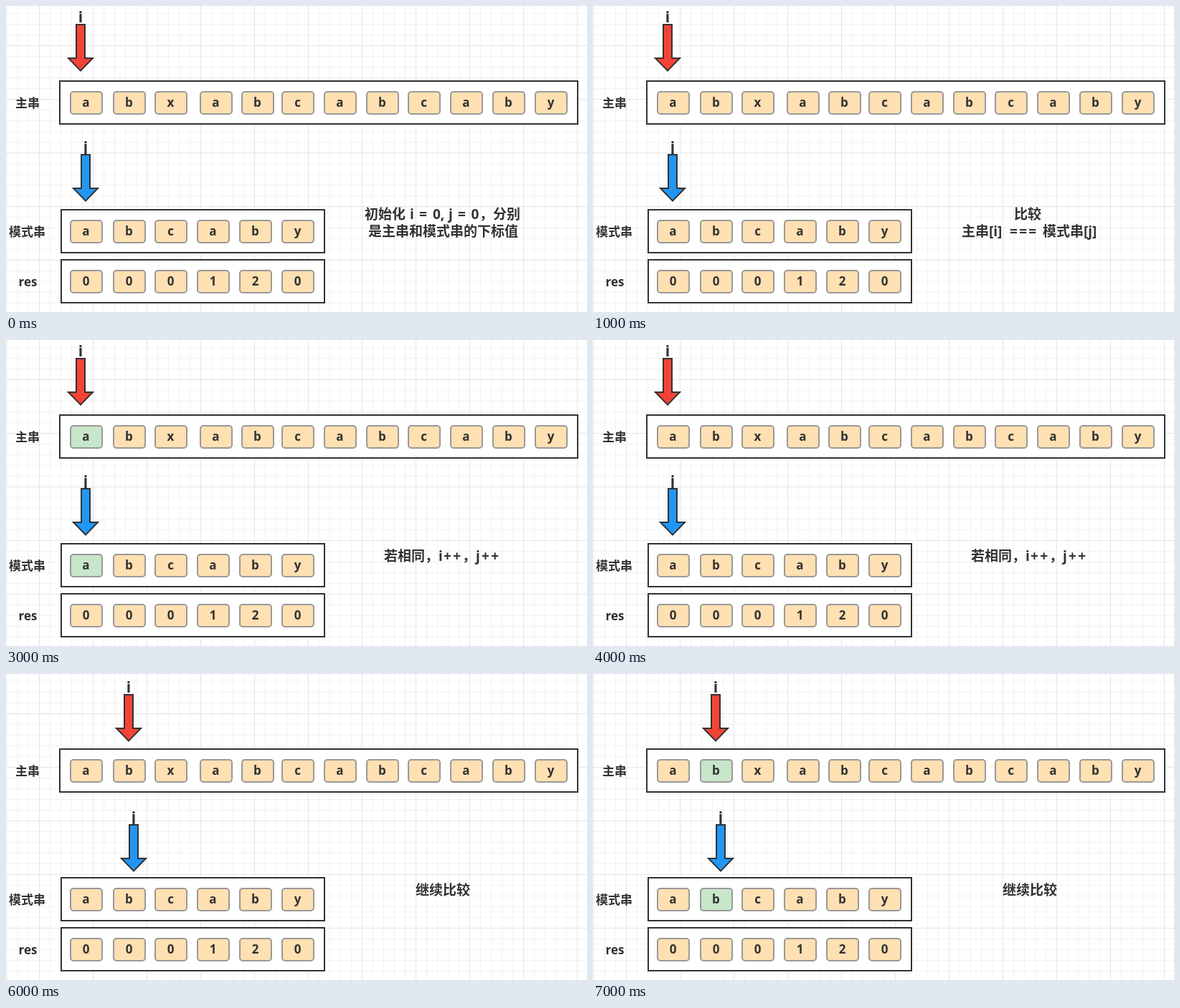
Animation, 810 px wide and 428 px high, one loop 8000 ms. Source, as an HTML page with a canvas:

```html
<!DOCTYPE html>
<html lang="zh-CN">
<head>
<meta charset="utf-8">
<style>
  html, body { margin: 0; width: 100%; height: 100%; overflow: hidden; background: #fff; }
  canvas { display: block; }
</style>
</head>
<body>
<canvas id="stage" width="810" height="428"></canvas>
<script>
const ctx = document.getElementById('stage').getContext('2d');
const LOOP = 8000;
const INK = '#323232', ORANGE = '#ffe0b2', GREEN = '#c8e6c9';
const MAIN_X = [90, 150, 208, 271, 329, 385, 444, 503, 561, 620, 679, 738];
const PATTERN_X = [90, 150, 208, 267, 326, 385];

// Captions: [text, x, baseline, letter spacing]
const CAPTIONS = {
  init: [
    ['初始化', 500, 298], ['i', 563, 298], ['=', 576, 298], ['0,', 595, 298],
    ['j', 617, 298], ['=', 630, 298], ['0', 648.5, 298], ['，分别', 660, 298],
    ['是主串和模式串的下标值', 505, 322]
  ],
  compare: [
    ['比较', 587, 298],
    ['主串[i]', 514, 322], ['===', 581, 322, 2.3], ['模式串[j]', 627, 322]
  ],
  same: [['若相同，i', 527, 309], ['++', 610, 309, 2.3], ['，j', 636, 309], ['++', 663, 309, 2.3]],
  next: [['继续比较', 571, 309]]
};

function text(str, x, y, size = 17, align = 'left', spacing = 0) {
  ctx.font = `bold ${size}px "Open Sans", "Noto Sans CJK SC", "Noto Sans CJK", sans-serif`;
  ctx.letterSpacing = spacing + 'px';
  ctx.textAlign = align;
  ctx.fillStyle = INK;
  ctx.fillText(str, x, y);
}

function drawGrid() {
  ctx.fillStyle = '#fff';
  ctx.fillRect(0, 0, 810, 428);
  for (const [step, color] of [[15, '#f2f2f2'], [75, '#e5e5e5']]) {
    ctx.fillStyle = color;
    for (let x = 46 % step; x < 810; x += step) ctx.fillRect(x, 0, 1, 428);
    for (let y = 55 % step; y < 428; y += step) ctx.fillRect(0, y, 810, 1);
  }
}

function drawRow(label, labelX, x, y, width, letters, cellsX, active) {
  ctx.lineWidth = 2;
  ctx.strokeStyle = INK;
  ctx.fillStyle = '#fff';
  ctx.fillRect(x, y, width, 60);
  ctx.strokeRect(x, y, width, 60);
  text(label, labelX, y + 37);
  cellsX.forEach((cellX, k) => {
    ctx.beginPath();
    ctx.roundRect(cellX, y + 15, 44, 31, 4);
    ctx.fillStyle = k === active ? GREEN : ORANGE;
    ctx.fill();
    ctx.strokeStyle = '#999';
    ctx.stroke();
    text(letters[k], cellX + 21.5, y + 36, 17, 'center');
  });
}

function drawPointer(name, x, y, color) {
  text(name, x, y - 3, 21, 'center');
  ctx.beginPath();
  for (const [dx, dy] of [[-6, 0], [6, 0], [6, 47], [17, 47], [0, 64.6], [-17, 47], [-6, 47]]) {
    ctx.lineTo(x + dx, y + dy);
  }
  ctx.closePath();
  ctx.fillStyle = color;
  ctx.fill();
  ctx.lineWidth = 2;
  ctx.strokeStyle = INK;
  ctx.stroke();
}

function draw(now) {
  const second = Math.floor(now % LOOP / 1000);
  const active = second === 3 ? 0 : second === 7 ? 1 : -1;
  const [dx, dy] = second >= 5 ? [67, 3] : [0, 0];
  const caption = second < 1 ? 'init' : second < 2 ? 'compare' : second < 6 ? 'same' : 'next';

  drawGrid();
  drawRow('主串', 13, 75, 105, 722, 'abxabcabcaby', MAIN_X, active);
  drawRow('模式串', 4, 77, 285, 367, 'abcaby', PATTERN_X, active);
  drawRow('res', 17.5, 77, 355, 367, '000120', PATTERN_X, -1);
  drawPointer('i', 104 + dx, 26 + dy, '#f44336');
  drawPointer('j', 111 + dx, 208 + dy, '#2196f3');
  for (const [str, x, y, spacing] of CAPTIONS[caption]) text(str, x, y, 19, 'left', spacing);
}

const start = performance.now();
function tick() {
  draw(performance.now() - start);
  requestAnimationFrame(tick);
}
tick();
</script>
</body>
</html>
```
